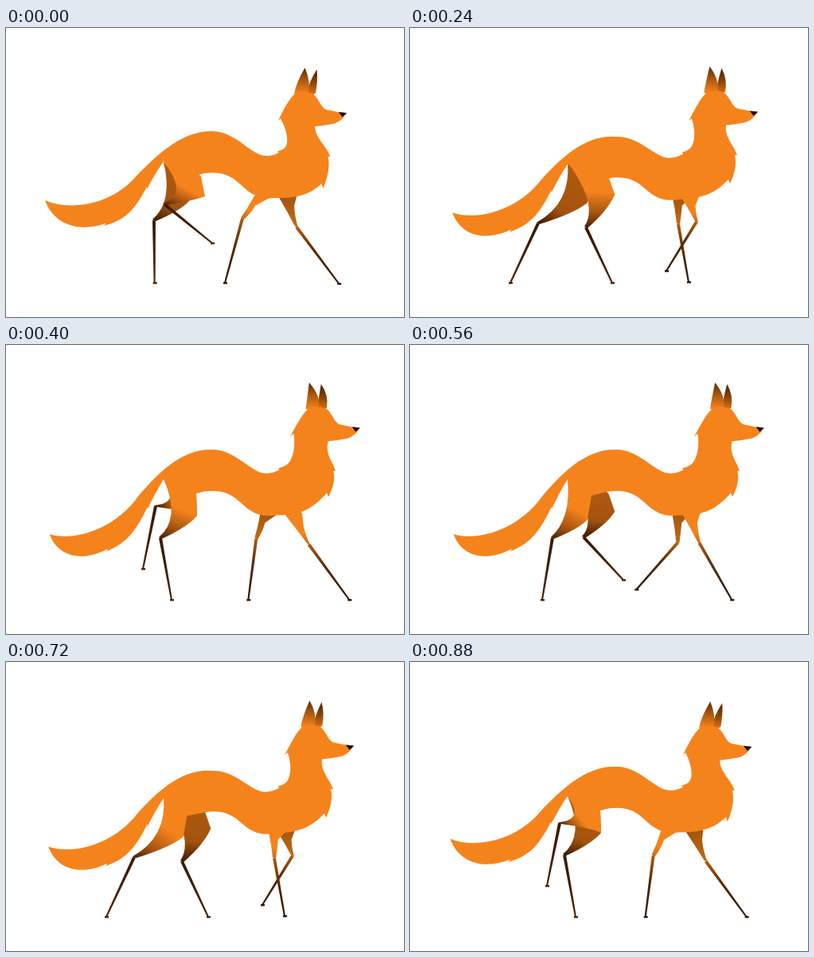
An HTML page with a canvas for the animation above (0.96 s loop, 500x364 px).

```html
<!DOCTYPE html>
<html lang="en">
<head>
<meta charset="utf-8">
<title>Walking fox</title>
<style>
  html, body { margin: 0; width: 100%; height: 100%; overflow: hidden; background: #fff; }
  canvas { display: block; }
</style>
</head>
<body>
<canvas id="stage" width="500" height="364"></canvas>
<script>
const ctx = document.getElementById('stage').getContext('2d');
const STEPS = 12, STEP_MS = 80;
const ORANGE = '#f5831c', BROWN = '#a3530f', DARK = '#3a1a02';

// Key points of one stride: phase, joint x and y, paw x and y.
// The far leg follows the same stride half a cycle later.
const HIND_STRIDE = [
  [0, 199, 222, 259, 271],
  [1, 218, 242, 268, 296],
  [3, 221, 251, 254, 321],
  [5, 194, 243, 208, 321],
  [7, 179, 243, 166, 321],
  [9, 161, 246, 126, 321],
  [11, 188, 203, 172, 282]
];
const FORE_STRIDE = [
  [0, 302, 240, 280, 321],
  [1, 332, 249, 280, 308],
  [3, 360, 244, 322, 306],
  [5, 376, 251, 427, 321],
  [7, 359, 249, 400, 321],
  [9, 337, 247, 350, 320],
  [11, 310, 244, 300, 321]
];

const hindShank = [[0, DARK], [1, '#4a2403']];
const foreShank = [[0, '#b05c10'], [.4, '#5a2c05'], [1, '#2a1400']];
const hindFarThigh = [[0, DARK], [.35, BROWN], [1, '#b05a0e']];
const hindNearThigh = [[0, '#4a2203'], [.25, BROWN], [.62, ORANGE]];
const foreFarThigh = [[0, '#c06a14'], [1, '#a3550d']];
const foreNearThigh = [[0, '#c96b14'], [.35, ORANGE]];

// Outline at rest: tail, back, neck, head, chest, belly.
const BODY = [
  'M', 49,217,
  'C', 78,230, 132,225, 165,185,
  'C', 190,160, 220,130, 258,130,
  'C', 290,130, 308,162, 328,161,
  'Q', 336,161, 343,157,
  'L', 341,155,
  'Q', 347,154, 350,151,
  'C', 356,145, 352,128, 344,114,
  'L', 341,117,
  'C', 348,102, 354,90, 362,83,
  'C', 368,79, 380,80, 386,84,
  'C', 393,91, 395,101, 402,103,
  'Q', 414,106, 427,107,
  'C', 423,114, 416,120, 408,121,
  'Q', 398,123, 387,124,
  'C', 388,139, 402,148, 407,162,
  'L', 404,162,
  'Q', 408,178, 398,202,
  'L', 396,196,
  'C', 384,208, 368,215, 338,214,
  'Q', 320,216, 308,208,
  'C', 292,198, 284,178, 249,183,
  'L', 226,189,
  'L', 198,168,
  'Q', 188,182, 177,203,
  'L', 177,200,
  'C', 163,226, 152,242, 123,249,
  'L', 125,246,
  'C', 92,258, 60,248, 49,217
];

const clamp = (v, lo, hi) => Math.min(hi, Math.max(lo, v));
const swayAt = angle => (1 - Math.cos(angle)) / 2;
const headShift = sway => 1 + 18 * sway;

function gradient(x0, y0, x1, y1, stops) {
  const g = ctx.createLinearGradient(x0, y0, x1, y1);
  stops.forEach(([at, color]) => g.addColorStop(at, color));
  return g;
}

// Periodic Hermite curve through the key points of a stride.
function strideAt(keys, phase) {
  const n = keys.length;
  const row = k => keys[(k + n) % n];
  const time = k => row(k)[0] + STEPS * Math.floor(k / n);
  let k = n - 1;
  while (keys[k][0] > phase) k--;
  const span = time(k + 1) - time(k), u = (phase - time(k)) / span;
  return row(k).map((a, j) => {
    const b = row(k + 1)[j], c = b - a;
    const m0 = (b - row(k - 1)[j]) / (time(k + 1) - time(k - 1)) * span;
    const m1 = (row(k + 2)[j] - a) / (time(k + 2) - time(k)) * span;
    return a + u * (m0 + u * (3 * c - 2 * m0 - m1 + u * (m0 + m1 - 2 * c)));
  }).slice(1);
}

function drawShank(jx, jy, px, py, stops) {
  const length = Math.hypot(px - jx, py - jy);
  const nx = (py - jy) / length, ny = (jx - px) / length;
  ctx.fillStyle = gradient(jx, jy, px, py, stops);
  ctx.beginPath();
  ctx.moveTo(jx - 2 * nx, jy - 2 * ny);
  ctx.lineTo(jx + 2 * nx, jy + 2 * ny);
  ctx.lineTo(px + nx, py + ny);
  ctx.lineTo(px - nx, py - ny);
  ctx.fill();
  ctx.fillRect(px - 2, py - 1, 5, 2.4);
}

function drawThigh(rear, bend, jx, jy, knee, front, stops) {
  const mx = (rear[0] + front[0]) / 2, my = (rear[1] + front[1]) / 2;
  ctx.fillStyle = gradient(jx, jy, mx, my, stops);
  ctx.beginPath();
  ctx.moveTo(...rear);
  ctx.quadraticCurveTo(...bend, jx - 2, jy - 1);
  ctx.lineTo(jx + 2, jy + 1);
  ctx.quadraticCurveTo(jx + (knee[0] - jx) * .75, (jy + knee[1]) / 2, ...knee);
  ctx.lineTo(...front);
  ctx.lineTo(mx, my - 12);
  ctx.fill();
}

function drawHindLeg(phase, thigh) {
  const [jx, jy, px, py] = strideAt(HIND_STRIDE, phase);
  const swing = Math.cos((phase - 2) / STEPS * 2 * Math.PI);
  const kneeX = 240 + 20 * swing;
  drawShank(jx, jy, px, py, hindShank);
  drawThigh([198, 169], [kneeX - 20, (jy + 195) / 2], jx, jy,
    [kneeX, 215 - 6 * swing], [239 + 12 * swing, 187], thigh);
}

function drawForeLeg(phase, sway, thigh) {
  const shift = 10 * (sway - .5);
  const [x, jy, px, py] = strideAt(FORE_STRIDE, phase);
  const jx = x + shift;
  const rearX = 331 + (jx - 340) * .45, frontX = rearX + 23;
  drawShank(jx, jy, px + shift, py, foreShank);
  drawThigh([rearX, 212], [(rearX + jx) / 2, (212 + jy) / 2], jx, jy,
    [(jx + frontX) / 2 - 3, 224], [frontX, 212], thigh);
}

// Moves a resting point with the tail droop, back bob and head sway.
function bodyWarp(angle) {
  const sway = swayAt(angle);
  const droop = Math.sin(angle / 2), bob = 7 * Math.sin(angle) ** 2;
  return (x, y) => {
    const tail = clamp((200 - x) / 150, 0, 1) * droop;
    const back = clamp(1 - Math.abs(x - 258) / 110, 0, 1) * bob;
    let head = 0, chest = 0;
    if (x > 385) {
      head = clamp((170 - y) / 45, .4, 1);
      chest = Math.max(0, y - 150) * .2 * sway;
    } else if (x > 340) {
      head = clamp((158 - y) / 45, 0, 1);
    }
    return [x + 6 * tail + headShift(sway) * head, y + 22 * tail + back - 3 * sway * head - chest];
  };
}

function drawBody(warp) {
  const ops = {
    M: [1, 'moveTo'], L: [1, 'lineTo'], Q: [2, 'quadraticCurveTo'], C: [3, 'bezierCurveTo']
  };
  ctx.fillStyle = ORANGE;
  ctx.beginPath();
  for (let i = 0; i < BODY.length;) {
    const [count, method] = ops[BODY[i++]];
    const args = [];
    for (let j = 0; j < count; j++, i += 2) args.push(...warp(BODY[i], BODY[i + 1]));
    ctx[method](...args);
  }
  ctx.fill();
}

function drawEar(tipX, tipY, left, right, baseY, stops) {
  ctx.fillStyle = gradient(tipX, tipY, tipX - 2, baseY, stops);
  ctx.beginPath();
  ctx.moveTo(left, baseY);
  ctx.quadraticCurveTo(left + 2, baseY - 13, tipX, tipY);
  ctx.quadraticCurveTo(right + 3, baseY - 16, right, baseY);
  ctx.quadraticCurveTo((left + right) / 2, baseY + 4, left, baseY);
  ctx.fill();
}

function drawEars(angle) {
  const sway = swayAt(angle);
  const lean = 5.5 * Math.cos(angle) - 2.5 * Math.sin(angle) - 5.5;
  ctx.save();
  ctx.translate(headShift(sway), -3 * sway);
  drawEar(389.5 + lean, 52, 377 + lean / 3, 388 + lean / 4, 82, [[0, '#4a2203'], [.6, '#8f480b'], [1, '#d06d17']]);
  drawEar(374.5 + lean, 50, 361 + lean / 5, 379 + lean / 3, 83, [[0, '#5a2c05'], [.45, '#a8560f'], [1, ORANGE]]);
  ctx.restore();
}

function drawNose(warp) {
  ctx.fillStyle = '#000';
  ctx.beginPath();
  [[417, 106], [427, 107], [421.5, 112]].forEach(p => ctx.lineTo(...warp(...p)));
  ctx.fill();
}

function draw() {
  const step = Math.floor(performance.now() / STEP_MS) % STEPS;
  const opposite = (step + STEPS / 2) % STEPS;
  const angle = step / STEPS * 2 * Math.PI;
  const sway = swayAt(angle), warp = bodyWarp(angle);
  ctx.fillStyle = '#fff';
  ctx.fillRect(0, 0, 500, 364);
  drawHindLeg(opposite, hindFarThigh);
  drawForeLeg(opposite, sway, foreFarThigh);
  drawEars(angle);
  drawBody(warp);
  drawHindLeg(step, hindNearThigh);
  drawForeLeg(step, sway, foreNearThigh);
  drawNose(warp);
  requestAnimationFrame(draw);
}
draw();
</script>
</body>
</html>
```
